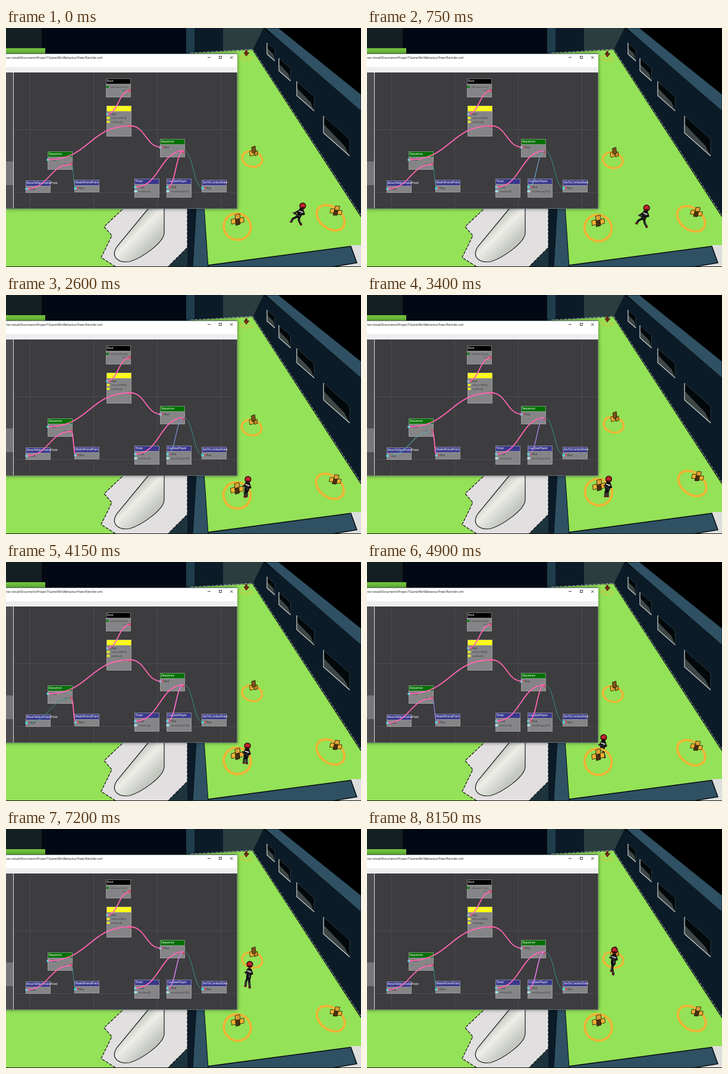
Recreate the animation shown at these times as an HTML page with a canvas. Size 597 px wide and 403 px high, loop 8200 ms.

```html
<!DOCTYPE html>
<html lang="en">
<head>
<meta charset="utf-8">
<title>Behaviour tree patrol</title>
<style>
html, body { margin: 0; width: 100%; height: 100%; overflow: hidden; background: #000; }
canvas { display: block; }
</style>
</head>
<body>
<canvas id="stage" width="597" height="403"></canvas>
<script>
const LOOP = 8200, BOB = LOOP / 4, CHECK = 980, STRIDE = 700;
const ARRIVE = 2400, LEAVE = 4280, IDLE = 9999;
const GREEN = '#94e257', NAVY = '#0b1b27', SLATE = '#2f5163', ORANGE = '#f2b233';
const PINK = 330, TEAL = 175;
const stage = document.getElementById('stage');
const view = stage.getContext('2d');
let g = view;

const clamp = k => Math.min(1, Math.max(0, k));
const lerp = (a, b, k) => a + (b - a) * k;

function rect(x, y, w, h, fill) {
  g.fillStyle = fill;
  g.fillRect(x, y, w, h);
}

function trace(pts) {
  g.beginPath();
  for (let i = 0; i < pts.length; i += 2) g.lineTo(pts[i], pts[i + 1]);
}

function stroke(color, width = 1) {
  g.strokeStyle = color;
  g.lineWidth = width;
  g.stroke();
}

function poly(pts, fill, edge, width) {
  trace(pts);
  g.closePath();
  g.fillStyle = fill;
  g.fill();
  if (edge) stroke(edge, width);
}

function line(pts, color, width) {
  trace(pts);
  stroke(color, width);
}

function dashed(paint) {
  g.setLineDash([5, 2]);
  paint();
  g.setLineDash([]);
}

function label(s, x, y, color, size, family = '"Liberation Sans", Arial') {
  g.font = `${size}px ${family}, sans-serif`;
  g.fillStyle = color;
  g.fillText(s, x, y);
}

function drawLevel() {
  rect(0, 0, 597, 403, '#000');
  rect(0, 0, 305, 43, '#030914');
  rect(0, 0, 60, 34, '#141f22');
  rect(0, 34, 66, 9, '#6fc03c');
  rect(0, 300, 310, 103, GREEN);

  // Walls behind and beside the floor
  rect(303, 0, 130, 45, NAVY);
  rect(303, 0, 14, 45, '#1f3d4c');
  rect(365, 0, 68, 45, '#2a3d3f');
  poly([433, 0, 597, 125, 597, 325, 415, 37], NAVY);
  poly([436, 0, 458, 0, 597, 112, 597, 140], SLATE, '#0a141a');
  for (let i = 0; i < 4; i++) opening(1.5 ** i);

  poly([306, 43, 415, 37, 597, 318, 597, 403, 306, 403], GREEN);
  line([415, 37, 597, 318], '#101a14', 1.5);
  dashed(() => line([310, 42, 415, 36, 597, 316], '#b9c6c2', 0.9));

  // Front wall and its corner
  poly([580, 366, 597, 366, 597, 403, 560, 403], '#dcdedd');
  poly([340, 400, 580, 368, 590, 396, 548, 403, 340, 403], SLATE, '#05090c', 1.5);

  drawHouse();

  // Dividing wall
  poly([305, 300, 333, 300, 340, 403, 305, 403], NAVY);
  poly([320, 300, 333, 300, 340, 403, 314, 403], SLATE, '#081016');
  rect(0, 402, 597, 1, '#10150f');
}

// Window hole in the right wall, nearer ones are larger
function opening(s) {
  const x = 439 + 40 * (s - 1), y = 25 + 52 * (s - 1);
  const w = 13 * s, drop = 11.5 * s, tall = 15 + 4 * s;
  poly([x, y, x + w, y + drop, x + w, y + drop + tall, x, y + tall], '#03080b', '#3b5058', 0.7);
  poly([x + 1, y + tall * 0.5, x + w * 0.8, y + drop + tall * 0.4, x + w, y + drop + tall, x + 1, y + tall], '#3e4646');
  line([x, y, x, y + tall, x + w, y + drop + tall], '#cfd6d3', 1.2);
}

function drawHouse() {
  poly([305, 345, 305, 403, 270, 403], '#1d343c');
  dashed(() => poly([202, 300, 305, 300, 305, 370, 272, 403, 185, 403, 160, 387, 178, 350, 165, 335], '#e2dfe0', '#111', 1.2));
  const shade = g.createLinearGradient(205, 335, 240, 370);
  shade.addColorStop(0, '#bdc2b8');
  shade.addColorStop(0.4, '#eeeee9');
  shade.addColorStop(1, '#c3c7c0');
  g.beginPath();
  g.moveTo(243, 300);
  g.lineTo(187, 368);
  g.bezierCurveTo(176, 384, 186, 397, 208, 394);
  g.bezierCurveTo(228, 388, 266, 362, 266, 345);
  g.lineTo(266, 300);
  g.fillStyle = shade;
  g.fill();
  stroke('#1b1d1b', 1.2);
}

function drawWindow() {
  g.save();
  g.shadowColor = 'rgba(0,0,0,.5)';
  g.shadowBlur = 6;
  rect(-5, 43, 394, 262, '#5f7178');
  g.restore();
  rect(0, 44, 389, 22, '#fff');
  rect(0, 66, 389, 9, '#eeeef0');
  label('ner.tolvad\\Documents\\Project7\\Game\\Bin\\BehaviourTrees\\Patroller.xml', 0, 51.5, '#111', 4.83, '"Open Sans"');
  line([339, 49.5, 344, 49.5], '#222', 0.8);
  g.strokeRect(358.5, 47.5, 4, 4);
  line([377, 47.5, 381.5, 52], '#222', 0.8);
  line([381.5, 47.5, 377, 52], '#222', 0.8);

  rect(0, 75, 388, 229, '#3d3c3f');
  for (let x = 40.5; x < 388; x += 107) line([x, 75, x, 304], '#4c4b4e');
  for (let y = 171.5; y < 304; y += 106) line([13, y, 388, y], '#4c4b4e');
  rect(0, 75, 12, 229, '#4d4d50');
  rect(0, 225, 12, 40, '#77777a');
  rect(12, 75, 1, 229, '#dedede');
}

function node(x, y, h, title, color, ink = '#fff') {
  rect(x, y, 42, h, '#858587');
  g.strokeStyle = '#a5a5a7';
  g.lineWidth = 0.7;
  g.strokeRect(x + 0.5, y + 0.5, 41, h - 1);
  rect(x, y, 42, 9.5, color);
  g.strokeRect(x + 0.5, y + 0.5, 41, 9);
  label(title, x + 1.5, y + 6, ink, 5);
}

function input(x, y) {
  rect(x - 2.5, y - 1.5, 5, 3.5, '#4fe0e6');
  rect(x + 2, y - 1.5, 3, 3, '#d23c48');
  label('Run', x + 6, y + 1.8, '#303033', 4.6);
}

function field(x, y, text, color) {
  rect(x - 2.5, y - 1.5, 5, 3.5, color);
  label(text, x + 5, y + 1.6, '#3d3d40', 4.3);
}

function output(x, y) {
  label('Out', x - 11, y + 1.6, '#4a4a4d', 4.3);
  rect(x - 1.5, y - 1.5, 4, 4, '#d23c48');
}

function sequence(x, y) {
  node(x, y, 31, 'Sequence', '#007000');
  input(x + 1, y + 14);
  output(x + 39, y + 21);
}

function leaf(x, y, title, extra) {
  node(x, y, extra ? 32 : 21, title, '#38388c');
  input(x + 2, y + 14);
  if (extra) field(x + 2, y + 21, extra, '#a9e4ee');
}

function drawNodes() {
  node(168, 85, 32, 'Root', '#000');
  field(170.5, 99, 'aRuntactTree[]', '#168018');
  output(207, 105);

  node(169, 131, 52, 'PrioritySelector', '#ffff00', '#e9e6a0');
  input(171, 145);
  field(172, 151.5, 'adousedAttI[]', '#f2ee20');
  field(172, 158, 'aretBool[]', '#f2ee20');
  output(208, 165);

  sequence(70, 208);
  sequence(259, 187);
  leaf(33, 257, 'MoveToNextPatrolPoint');
  leaf(115, 256, 'WaitAtPatrolPoint');
  leaf(216, 254, 'Timer', 'duration[2]');
  leaf(270, 254, 'CanSeePlayer', 'viewRange[100]');
  leaf(329, 256, 'SetToCombatState');
}

// Links glow pink when run, then cool to thin teal with age
function link(x0, y0, x1, y1, age = 0) {
  const k = clamp((age - 300) / 1000);
  const cool = 1 - (1 - k) ** 2;
  const mx = (x0 + x1) / 2;
  g.beginPath();
  g.moveTo(x0, y0);
  g.bezierCurveTo(mx, y0, mx, y1, x1, y1);
  stroke(`hsl(${lerp(PINK, TEAL, cool)} ${45 + 55 * (1 - cool) ** 3}% ${70 - 30 * k * k}%)`, lerp(1.8, 1, cool));
}

function drawLinks(t) {
  const waiting = t >= ARRIVE && t < LEAVE;
  link(208, 106, 170, 145);
  link(209, 165, 71, 222);
  link(209, 165, 261, 201);
  link(110, 230, 35, 271, waiting ? t - ARRIVE : 0);
  link(110, 230, 117, 270, waiting ? 0 : t < ARRIVE ? IDLE : t - LEAVE);
  link(299, 207, 218, 268);
  link(299, 207, 272, 268, (t + 100) % CHECK);
  link(299, 207, 331, 270, IDLE);
}

function ring(x, y, rx, ry, turn, width) {
  g.beginPath();
  g.ellipse(x, y, rx, ry, turn, 0, Math.PI * 2);
  stroke(ORANGE, width);
}

// Flat box face: a skewed square around x, y
function face(x, y, w, h, fill) {
  poly([x - w, y - h + 1, x + w - 1, y - h - 1, x + w, y + h - 1, x - w + 1, y + h + 1], fill, '#1c1204', 0.8);
}

function crate(x, y, size, turn) {
  g.save();
  g.translate(x, y);
  g.rotate(turn);
  g.scale(size, size);
  face(0, 3, 4, 6, '#4a3010');
  face(-7, 3, 4, 4, ORANGE);
  face(7, 1, 4, 4, ORANGE);
  face(0, -5, 4.5, 4, '#dba035');
  g.restore();
}

function midPickup(b) {
  ring(414 - b, 221 + b * 2.6, 17, 13, 0.25, 3.3);
  const x = 416.5 - b * 0.5, y = 208 + b * 2.8;
  face(x - 3, y + 3, 4, 4, ORANGE);
  face(x + 4, y + 3, 3, 3.5, '#c98e27');
  face(x, y - 3, 3.5, 5, '#7a5219');
}

function farPickup(b) {
  g.globalAlpha = 0.6;
  ring(403.5, 50 + b * 2, 10, 3.5, 0.1, 1.5);
  g.globalAlpha = 1;
  const y = 41.5 + b * 2;
  rect(402, y - 4, 4, 6, '#6f2a14');
  poly([400, y, 409, y, 404, y + 6], '#7e2d16', '#2a0d06', 0.7);
}

// Patrol path of the head: [time, x, y]
const PATH = [[0, 499, 300], [ARRIVE, 407, 311], [LEAVE, 406, 310], [4900, 398, 296], [6300, 404, 251], [LOOP, 416.5, 203]];

function headAt(t) {
  const i = PATH.findIndex(p => p[0] > t);
  const [t0, x0, y0] = PATH[i - 1], [t1, x1, y1] = PATH[i];
  const k = (t - t0) / (t1 - t0);
  return [lerp(x0, x1, k), lerp(y0, y1, k)];
}

function drawSoldier(t) {
  const [hx, hy] = headAt(t);
  const side = 0.3 + 0.7 * clamp(1 - t / ARRIVE);
  const lean = -2 - 9 * side ** 1.5, h = 31 + 9 * clamp((t - LEAVE) / 3000);
  const pace = t < ARRIVE || t > LEAVE ? 1 : 0.2;
  const swing = Math.sin(t / STRIDE * Math.PI * 2 + 0.9) * pace;
  const sx = hx + lean * 0.25, sy = hy + h * 0.25;
  const px = hx + lean * 0.6, py = hy + h * 0.55;

  g.lineCap = g.lineJoin = 'round';
  for (const leg of [-1, 1]) {
    const s = swing * leg;
    const fx = hx + lean + leg * 2 + s * (2 + 6 * side), fy = hy + h + s * 3 - 2;
    const kx = (px + fx) / 2 + leg - 3 * side, ky = (py + fy) / 2;
    line([px + leg, py, kx, ky, fx, fy], '#101011', 3.6);
    line([kx, ky, fx, fy - 2], '#6a6d70', 1);
    line([fx - 2, fy, fx + 1, fy], '#7c1d24', 1.8);
  }
  line([sx, sy, px, py], '#0f0f10', 8);
  line([sx + 1, sy + 2, px + 1, py], '#505356', 2);

  // Arms and rifle
  const gx = sx - 3 - 8 * side, gy = sy + 4 + swing;
  line([sx + 3, sy, sx + 5, sy + 6, gx + 4, gy + 3], '#101011', 3);
  line([sx - 3, sy, gx, gy], '#101011', 3);
  line([sx - 3, sy + 1, sx + 3, sy + 3], '#d5d3cd', 1.8);
  line([gx - 2, gy - 1, gx + 6, gy + 4], '#2b2c2f', 2);

  g.beginPath();
  g.arc(hx, hy, 5, 0, Math.PI * 2);
  g.fillStyle = '#c3222b';
  g.fill();
  stroke('#190608', 1.3);
  line([hx - 3, hy + 3, hx + 2, hy + 3], '#3a0b10', 2);
  g.lineCap = 'butt';
  g.lineJoin = 'miter';
}

// The fixed layer is painted once
const backdrop = document.createElement('canvas');
backdrop.width = stage.width;
backdrop.height = stage.height;
g = backdrop.getContext('2d');
drawLevel();
drawWindow();
drawNodes();
g = view;

function draw(t) {
  const b = Math.sin(t / BOB * Math.PI * 2);
  const behind = t > LEAVE + 200;
  g.drawImage(backdrop, 0, 0);
  drawLinks(t);
  farPickup(b);
  midPickup(b);
  ring(546 - b * 1.3, 320 + b * 2.6, 26, 18, 0.65, 3.8);
  crate(555.5 - b * 1.3, 308 + b * 3, 0.9, 0.35);
  if (behind) drawSoldier(t);
  ring(389 - b * 0.5, 335 + b * 3, 23, 22, 0.5, 3.8);
  crate(389.5 - b, 323 + b * 3, 1, 0);
  if (!behind) drawSoldier(t);
}

const start = performance.now();
function tick(now) {
  draw(Math.max(0, now - start) % LOOP);
  requestAnimationFrame(tick);
}
draw(0);
requestAnimationFrame(tick);
</script>
</body>
</html>
```
